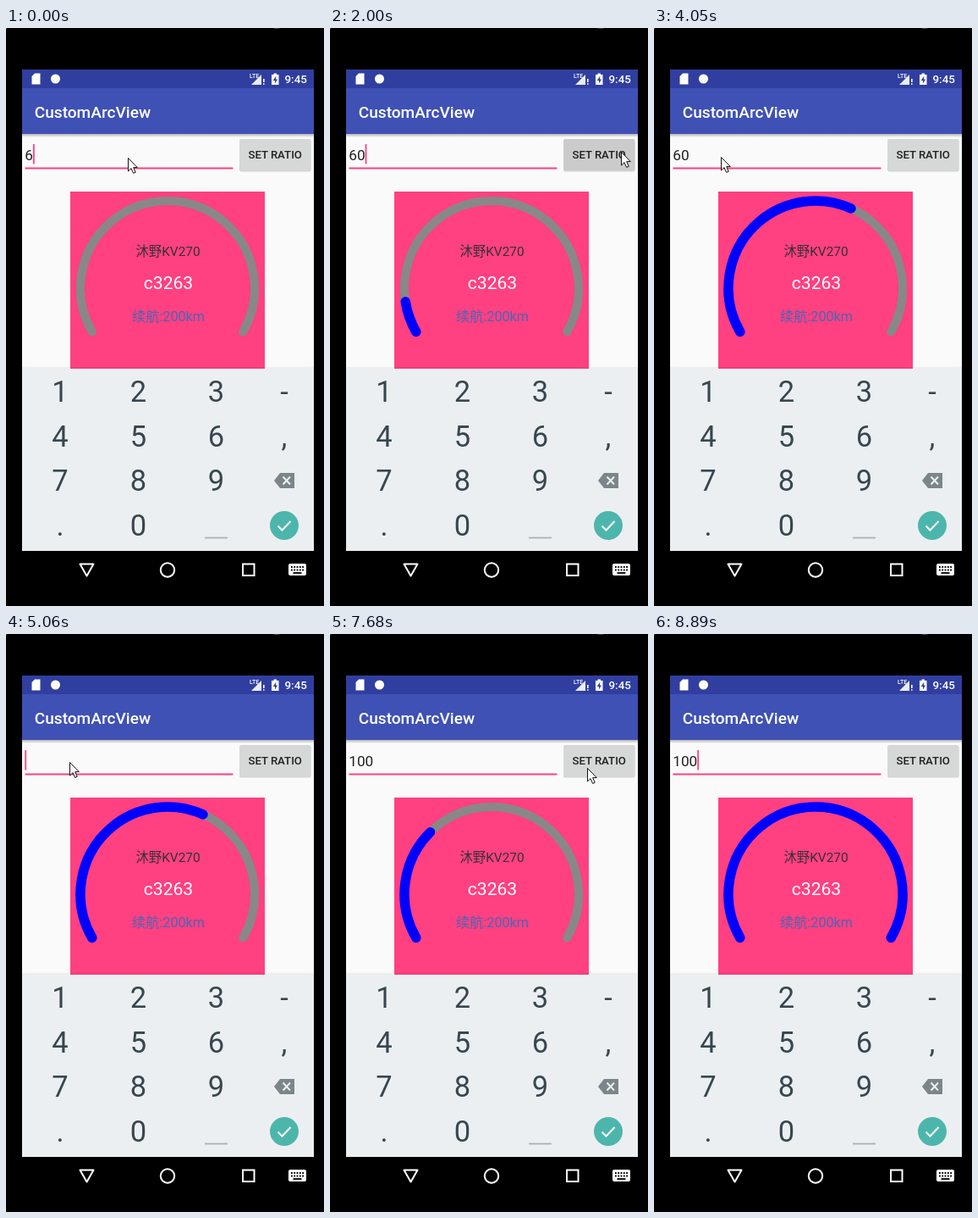
An HTML page that plays this animation: 376x682 px, repeating every 9360 ms.

```html
<!DOCTYPE html>
<html lang="en">
<head>
<meta charset="utf-8">
<title>Arc gauge demo</title>
<style>
  html, body { margin: 0; width: 100%; height: 100%; overflow: hidden; background: #000; }
  svg { display: block; }
  text { font-family: Roboto, "Noto Sans CJK SC", "Noto Sans CJK", sans-serif; }
  .mid { text-anchor: middle; }
  .bold { font-weight: 500; }
  .line { fill: none; stroke: #fff; stroke-width: 2; }
</style>
</head>
<body>
<svg width="376" height="682" viewBox="0 0 376 682">
  <defs>
    <linearGradient id="shade" x2="0" y2="1">
      <stop stop-color="#000" stop-opacity=".28"/>
      <stop offset="1" stop-color="#000" stop-opacity="0"/>
    </linearGradient>
  </defs>
  <rect width="376" height="682"/>
  <ellipse cx="320" cy="-2" rx="7" ry="3" fill="#444"/>
  <circle r="1.5" fill="#444"/>

  <!-- status bar and toolbar -->
  <rect x="19" y="71" width="345" height="332" fill="#fafafa"/>
  <rect x="19" y="49" width="345" height="23" fill="#303f9f"/>
  <rect x="19" y="71" width="345" height="54" fill="#3f51b5"/>
  <rect x="19" y="125" width="345" height="4" fill="url(#shade)"/>
  <g fill="#fff">
    <path d="M34 53.5H40.5V66.5H30.5V57Z"/>
    <circle cx="58.5" cy="60" r="5.5"/>
    <text x="288" y="59" font-size="7" class="bold">LTE</text>
    <path d="M302 55V67H290Z" opacity=".9"/>
    <path d="M304 60h1.6v4h-1.6zM304 65.2h1.6v1.6h-1.6z"/>
    <path d="M314 55h2.5v-1.5h3.5V55h2.5V67H314Z"/>
    <path d="M319.3 56.5L315.8 62H318V65.5L321 60.5H319Z" fill="#303f9f"/>
    <text x="329.5" y="65.4" font-size="13.4" class="bold">9:45</text>
    <text x="33.7" y="106" font-size="19.1" class="bold">CustomArcView</text>
  </g>

  <!-- input row -->
  <path d="M22.5 165.5H268.5" stroke="#ff4081" stroke-width="1.8"/>
  <text id="field" x="22.3" y="155.5" font-size="17.2" fill="#222"></text>
  <rect id="caret" y="137" width="1.8" height="23.5" fill="#ff4081"/>
  <path id="handle" d="M42 166.5L48.4 172.4A8.5 8.5 0 1 1 35.6 172.4Z" fill="#ff4081"/>
  <rect x="276" y="132" width="84.5" height="37.5" rx="2" fill="#bbb" opacity=".6"/>
  <rect id="button" x="276" y="131" width="84.5" height="37" rx="2"/>
  <text x="318.2" y="154.4" font-size="13.2" fill="#222" class="mid bold">SET RATIO</text>

  <!-- gauge -->
  <rect x="76" y="193" width="230" height="210" fill="#ff4081"/>
  <g fill="none" stroke-linecap="round">
    <path d="M101.8 358.5A103 103 0 1 1 280.2 358.5" stroke="#888" stroke-width="10"/>
    <path id="arc" d="M101.8 358.5A103 103 0 1 1 280.2 358.5" pathLength="240" stroke="#00f" stroke-width="11.5"/>
  </g>
  <g class="mid">
    <text x="191.5" y="269.3" font-size="15.4" fill="#333">沐野KV270</text>
    <text x="192" y="308" font-size="21.1" fill="#fff">c3263</text>
    <text x="192" y="346" font-size="16.2" fill="#4a66b4">续航:200km</text>
  </g>

  <!-- keypad -->
  <rect x="19" y="400" width="345" height="3" fill="#000" opacity=".05"/>
  <rect x="19" y="402" width="345" height="215" fill="#eceff1"/>
  <g id="keys" class="mid" font-size="34.5" fill="#37474f"></g>
  <path d="M235 601.5H262" stroke="#a7b1b6" stroke-width="1.8"/>
  <path d="M317 534L324 525H341V543H324Z" fill="#7b868b"/>
  <path d="M327.5 529.5L336 538.5M336 529.5L327.5 538.5" stroke="#eceff1" stroke-width="2"/>
  <circle cx="329" cy="587" r="17" fill="#4db6ac"/>
  <path d="M321.5 587.5L326.5 592.5L336.5 582" class="line"/>

  <!-- navigation bar -->
  <path d="M87.5 632.5H103.5L95.5 646.5Z" class="line" stroke-linejoin="round"/>
  <circle cx="191" cy="639.5" r="8.2" class="line"/>
  <rect x="280" y="632.5" width="13.5" height="13.5" class="line"/>
  <rect x="334" y="632" width="21" height="14" rx="2" fill="#fff"/>
  <path d="M337 636H353M337 639.5H353" stroke="#000" stroke-width="1.8" stroke-dasharray="1.8 1.5"/>
  <path d="M339.5 643H349.5" stroke="#000" stroke-width="1.8"/>

  <path id="pointer" d="M.5 .5V16L4 12.6L6.6 18.4L9.2 17.3L6.7 11.6H11.3Z" fill="#fff" stroke="#111"/>
</svg>
<script>
const LOOP = 9360;
const $ = id => document.getElementById(id);

// Screen refreshes: [first, last, count]
const refreshes = [
  [0, 0, 1], [310, 310, 1], [740, 740, 1], [1040, 2000, 8], [2150, 2690, 5],
  [3120, 4050, 8], [4200, 4330, 2], [4630, 4630, 1], [4900, 5060, 2], [5580, 5580, 1],
  [5880, 6000, 2], [6560, 7530, 8], [7680, 8610, 8], [8890, 8890, 1]
].flatMap(([a, b, n]) =>
  Array.from({ length: n }, (_, i) => Math.round(a + (b - a) * i / Math.max(1, n - 1))));

const typed = [[0, '6'], [740, '60'], [4900, '6'], [5060, ''], [5580, '1'], [5880, '10'], [6000, '100']];
const blinks = [0, 310, 740, 1240, 1700, 2240, 2690, 3120, 3600, 4050, 4200, 4630, 4900,
  6500, 7000, 7500, 8000, 8450, 8850];
const path = [
  [0, 144, 153], [900, 144, 153], [1588, 364, 151], [1863, 344, 146], [2700, 344, 146],
  [3120, 314, 144], [4050, 79, 152], [4200, 75, 151], [6421, 75, 151], [6830, 274, 162],
  [7114, 304, 158], [7813, 304, 158], [8477, 324, 586]
];

const last = (list, test) => list.filter(test).pop();

function pointerAt(t) {
  const i = path.findIndex(p => p[0] > t);
  if (i < 0) return path[path.length - 1].slice(1);
  const [a, b] = [path[i - 1], path[i]];
  const k = (t - a[0]) / (b[0] - a[0]);
  return [1, 2].map(j => a[j] + (b[j] - a[j]) * k);
}

function grow(t, start, duration, total) {
  const k = Math.min(1, (t - start) / duration);
  return total * (1 - Math.cos(Math.PI * k)) / 2;
}

function sweepAt(t) {
  if (t < 2000) return 0;
  return t < 7530 ? grow(t, 1770, 920, 144) : grow(t, 7361, 843, 240);
}

const show = (id, on) => $(id).setAttribute('visibility', on ? 'visible' : 'hidden');

function draw(now) {
  const time = now % LOOP;
  const t = last(refreshes, r => r <= time);
  const text = last(typed, s => s[0] <= t)[1];
  const sweep = sweepAt(t);
  const pressed = (t >= 1860 && t < 3120) || (t > 7300 && t < 7500);

  $('field').textContent = text;
  $('caret').setAttribute('x', 22.3 + 9.65 * text.length);
  show('caret', blinks.filter(b => b <= t).length % 2);
  show('handle', t >= 4330 && t < 4900);
  $('button').setAttribute('fill', pressed ? '#cbcbcb' : '#d6d7d7');
  show('arc', sweep > 0);
  $('arc').setAttribute('stroke-dasharray', sweep >= 240 ? 'none' : `${sweep} 999`);
  $('pointer').setAttribute('transform', `translate(${pointerAt(t)})`);
  show('pointer', t < 8600);
  requestAnimationFrame(draw);
}

const columns = [64, 156.5, 248.5, 329];
['123-', '456,', '789', '.0'].forEach((row, r) => [...row].forEach((key, c) => {
  const label = document.createElementNS('http://www.w3.org/2000/svg', 'text');
  label.setAttribute('x', columns[c]);
  label.setAttribute('y', 440.7 + 52.8 * r);
  label.textContent = key;
  $('keys').append(label);
}));

draw(performance.now());
</script>
</body>
</html>
```
